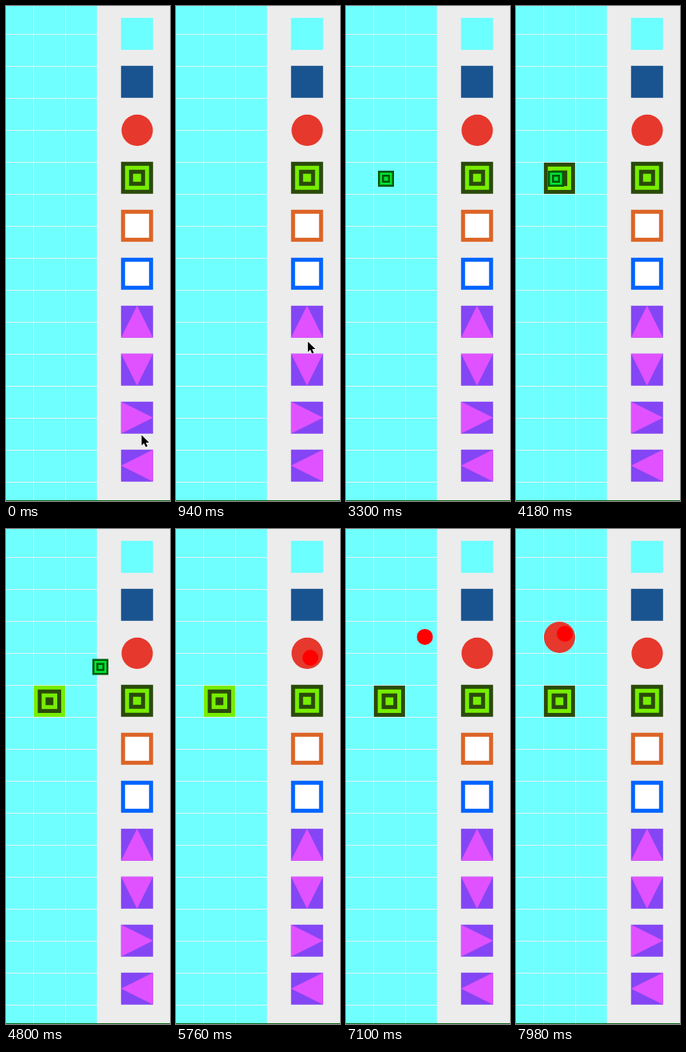
These frames come from a looping animation (205 px wide and 619 px high, 8000 ms). An HTML page with a canvas:

```html
<!DOCTYPE html>
<html lang="en">
<head>
<meta charset="utf-8">
<title>Tile palette</title>
<style>
  html, body { margin: 0; width: 100%; height: 100%; overflow: hidden; background: #ececec; }
  canvas { display: block; }
</style>
</head>
<body>
<canvas id="stage" width="205" height="619"></canvas>
<script>
const ctx = document.getElementById('stage').getContext('2d');
const LOOP = 8000, BLINK = 500;
const PICK_TARGET = 1900, DROP_TARGET = 3440, PICK_BALL = 5300, DROP_BALL = 7800;
const DARK = '#2a4a0a', LIME = '#76ee00', CYAN = '#6cffff', RED = '#e6382c';

// The pointer rests, then eases to the next stop along a slight arc
const start = { x: 169.5, y: 536.5 };
const moves = [
  { from: 300, to: 1850, x: 157, y: 222, bow: 0 },
  { from: 2040, to: 3250, x: 50, y: 216, bow: 0 },
  { from: 4250, to: 5250, x: 168, y: 161, bow: -12 },
  { from: 6200, to: 7700, x: 61, y: 131, bow: -7 }
];

function pointer(t) {
  let { x, y } = start;
  for (const m of moves) {
    const u = Math.min(1, Math.max(0, (t - m.from) / (m.to - m.from)));
    const s = u * u * (3 - 2 * u);
    x += (m.x - x) * s;
    y += (m.y - y) * s + m.bow * Math.sin(Math.PI * u);
  }
  return [x, y];
}

function rect(x, y, w, h, color) {
  ctx.fillStyle = color;
  ctx.fillRect(x, y, w, h);
}

const square = (x, y, size, color) => rect(x - size / 2, y - size / 2, size, size, color);

function disc(x, y, r, color) {
  ctx.fillStyle = color;
  ctx.beginPath();
  ctx.arc(x, y, r, 0, 2 * Math.PI);
  ctx.fill();
}

function rings(x, y, size, a, b) {
  for (let i = 4; i > 0; i--) square(x, y, size * i / 4, i % 2 ? b : a);
}

function arrowTile(angle) {
  square(0, 0, 40, '#8446f4');
  ctx.rotate(angle);
  ctx.fillStyle = '#e052ff';
  ctx.beginPath();
  ctx.moveTo(0, -20);
  ctx.lineTo(20, 20);
  ctx.lineTo(-20, 20);
  ctx.fill();
}

function frameTile(color) {
  square(0, 0, 40, color);
  square(0, 0, 30, '#fff');
}

const tiles = [
  () => square(0, 0, 40, CYAN),
  () => square(0, 0, 40, '#1a5490'),
  () => disc(0.2, 0.6, 19.6, RED),
  () => rings(0, 0, 40, DARK, LIME),
  () => frameTile('#dc6426'),
  () => frameTile('#0064ff'),
  () => arrowTile(0),
  () => arrowTile(Math.PI),
  () => arrowTile(Math.PI / 2),
  () => arrowTile(-Math.PI / 2)
];

function at(x, y, paint) {
  ctx.save();
  ctx.translate(x, y);
  paint();
  ctx.restore();
}

function palette() {
  rect(113.7, 0, 92, 619, '#ececec');
  tiles.forEach((paint, i) => at(163.8, 34.8 + 60 * i, paint));
}

function board(t) {
  rect(0, 0, 114, 619, '#70ffff');
  const line = '#e0f4f4';
  for (let x = 34; x < 114; x += 40) rect(x, 0, 1, 619, line);
  for (let y = 35; y < 619; y += 40) rect(0, y, 114, 1, line);
  if (t >= DROP_TARGET) {
    const lit = Math.floor((t - DROP_TARGET) / BLINK) % 2 === 0;
    rings(54.3, 215.4, 39, lit ? LIME : DARK, lit ? DARK : LIME);
  }
  if (t >= DROP_BALL) disc(54.4, 135.5, 19.5, RED);
}

const arrow = new Path2D('M0 0V13L3 10.2L5.2 15L7.4 14L5.3 9.4H9.4Z');

function cursor() {
  ctx.lineWidth = 1.2;
  ctx.strokeStyle = '#fff';
  ctx.stroke(arrow);
  ctx.fillStyle = '#000';
  ctx.fill(arrow);
}

function drawPointer(t) {
  const [x, y] = pointer(t);
  if (t >= PICK_BALL) disc(x, y, 10, '#f00');
  else if (t >= PICK_TARGET) rings(x, y, 20, '#005a0a', '#00e632');
  else at(x, y, cursor);
}

function draw(now) {
  const t = now % LOOP;
  board(t);
  palette();
  rect(0, 618, 205, 1, '#0a6414');
  drawPointer(t);
  requestAnimationFrame(draw);
}
draw(0);
</script>
</body>
</html>
```
